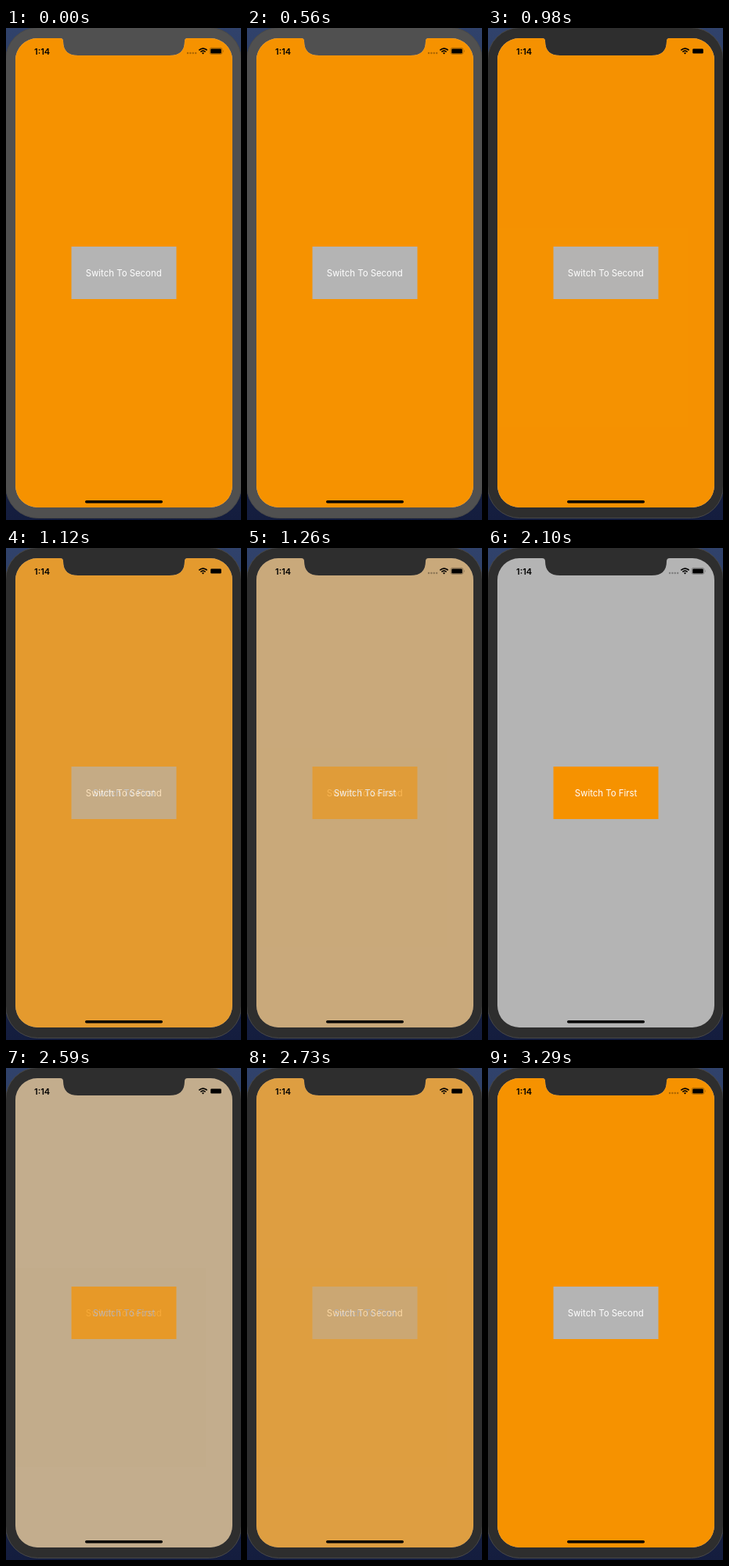
Recreate the animation shown at these times as an HTML page. Size 300 by 628 pixels, loop 3.36 s.

```html
<!DOCTYPE html>
<html lang="en">
<head>
<meta charset="utf-8">
<title>Screen cross-fade</title>
<style>
  html, body { margin: 0; width: 100%; height: 100%; overflow: hidden; background: #1b2a4c; }
  svg { display: block; width: 100%; height: 100%; }
  text { font-family: Inter, "Liberation Sans", sans-serif; }
  .title { font-size: 11.4px; fill: #fff; text-anchor: middle; }
</style>
</head>
<body>
<svg viewBox="0 0 300 628">
  <defs>
    <linearGradient id="desktop" x2="0" y2="1">
      <stop stop-color="#30426b"/>
      <stop offset="1" stop-color="#141d3e"/>
    </linearGradient>
    <clipPath id="display">
      <path d="M40 13H69Q73 13 73 17Q73 35 92 35H209Q228 35 228 17Q228 13 232 13H261A28 28 0 0 1 289 41V584A28 28 0 0 1 261 612H40A28 28 0 0 1 12 584V41A28 28 0 0 1 40 13Z"/>
    </clipPath>
  </defs>

  <rect width="300" height="628" fill="url(#desktop)"/>
  <rect id="bezel" x="-.5" y="-.5" width="301" height="626" rx="41" stroke="#484848"/>

  <g clip-path="url(#display)">
    <g id="second">
      <rect width="300" height="628" fill="#b4b4b4"/>
      <rect x="83.5" y="279" width="134" height="67" fill="#f69200"/>
      <text id="firstTitle" class="title" x="150.5" y="317">Switch To First</text>
    </g>
    <g id="first">
      <rect width="300" height="628" fill="#f69200"/>
      <rect x="83.5" y="279" width="134" height="67" fill="#b4b4b4"/>
      <text class="title" x="150.2" y="317">Switch To Second</text>
    </g>

    <text x="36" y="33.5" font-size="11" font-weight="600">1:14</text>
    <g id="details">
      <g fill="#000" opacity=".3">
        <circle cx="232" cy="32" r="1.2"/><circle cx="235.4" cy="32" r="1.2"/>
        <circle cx="238.8" cy="32" r="1.2"/><circle cx="242.2" cy="32" r="1.2"/>
      </g>
      <rect x="260" y="25.4" width="16" height="8" rx="2.2" fill="none" stroke="#000" stroke-width=".7" opacity=".4"/>
      <path d="M277 28v3q1.2-1.5 0-3" opacity=".4"/>
    </g>
    <rect x="261.2" y="26.6" width="13.6" height="5.8" rx="1.2"/>
    <g fill="none" stroke="#000" stroke-width="1.5">
      <path d="M246.3 28.4Q251.5 23.8 256.7 28.4"/>
      <path d="M248.3 30.5Q251.5 27.8 254.7 30.5"/>
    </g>
    <path d="M249.8 31.8Q251.5 30.6 253.2 31.8L251.5 33.6Z"/>
    <rect x="101" y="603" width="99" height="3.4" rx="1.7"/>
  </g>
</svg>

<script>
  const LOOP = 3360, STEP = 70, FADE = 500;
  const [bezel, first, firstTitle, details] =
    ["bezel", "first", "firstTitle", "details"].map(id => document.getElementById(id));

  const between = (t, from, to) => t >= from && t < to;

  function fade(t, start) {
    const u = Math.min(1, Math.max(0, (t - start) / FADE));
    return (1 - Math.cos(Math.PI * u)) / 2;
  }

  function draw(now) {
    const t = Math.floor((now % LOOP) / STEP) * STEP;
    bezel.setAttribute("fill", t < 770 ? "#505050" : "#2e2e2e");
    first.setAttribute("opacity", 1 - fade(t, 950) + fade(t, 2435));
    firstTitle.style.fill = between(t, 2520, 3080) ? "#b5aaa8" : "#fff";
    const hidden = between(t, 770, 1190) || between(t, 2520, 3080);
    details.setAttribute("visibility", hidden ? "hidden" : "visible");
  }

  const start = performance.now();
  function tick() {
    draw(performance.now() - start);
    requestAnimationFrame(tick);
  }
  tick();
</script>
</body>
</html>
```
